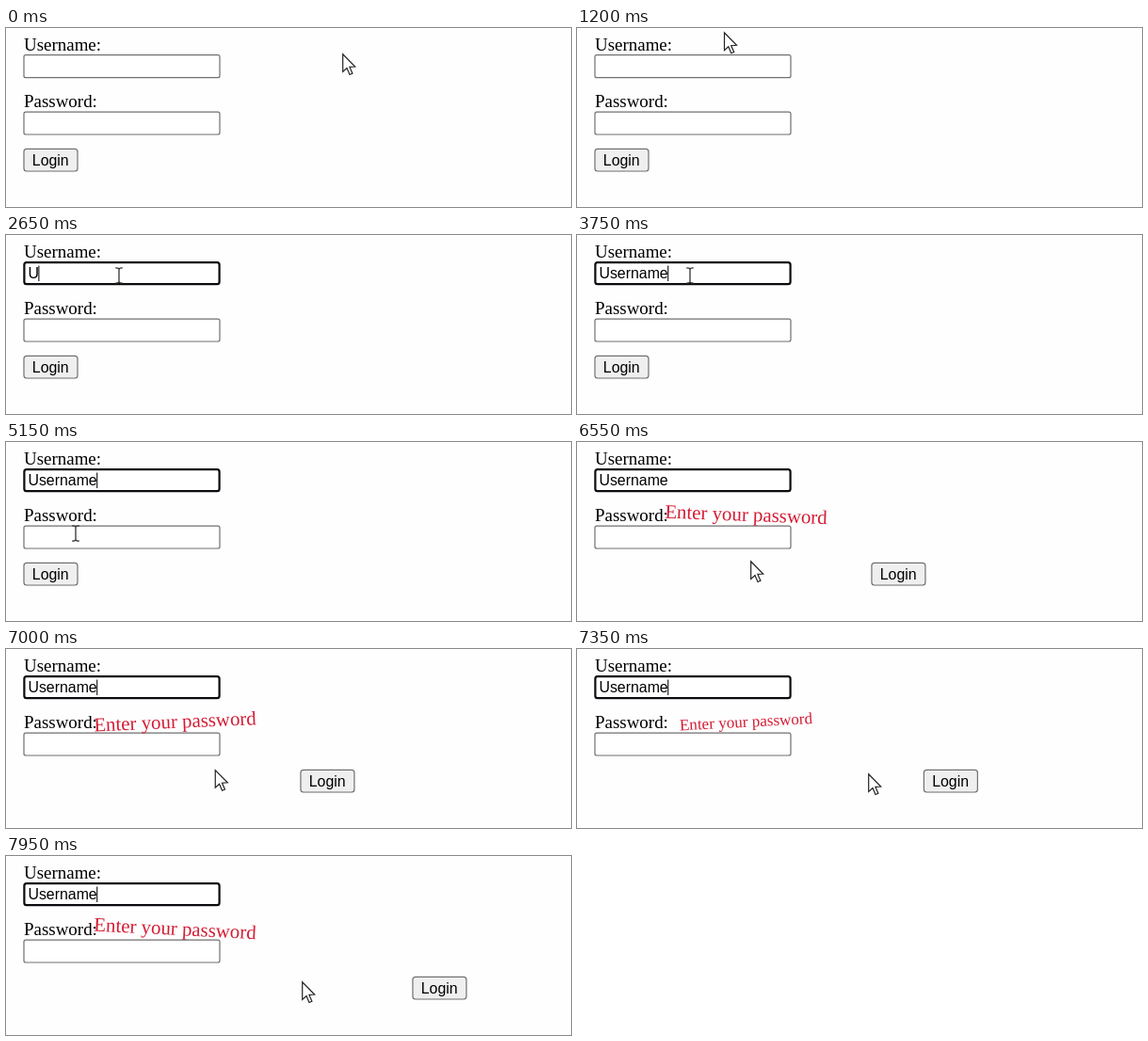
Write an HTML page with a canvas that moves like this. It is 600 px wide and 190 px high and loops after 8 s.

```html
<!DOCTYPE html>
<html lang="en">
<head>
<meta charset="utf-8">
<title>Login form</title>
<style>
  html, body { margin: 0; width: 100%; height: 100%; overflow: hidden; background: #fefefe; }
  canvas { display: block; width: 600px; height: 190px; }
</style>
</head>
<body>
<canvas id="stage" width="600" height="190"></canvas>
<script>
const ctx = document.getElementById('stage').getContext('2d');
const LOOP = 8000, STEP = 50, BLINK = 530, ZOOM = 1.19;
const SERIF = '18.95px "Liberation Serif", "Times New Roman", serif';
const SANS = '15.9px "Liberation Sans", Arial, sans-serif';
const LEFT = 19, FIELD_WIDTH = 208;
const VALUE = 'Username', FOCUS = 1650, TYPE_START = 2650, TYPE_GAP = 151;

// On each hover the button dodges right and the error wobbles.
const HOVERS = [5380, 6237, 7267];

const MOVES = [
  { from: 0, to: 450, x: 159, y: 22 },
  { from: 750, to: 900, x: 157, y: 3 },
  { from: 1170, to: 1450, x: 120, y: 43 },
  { from: 4700, to: 5100, x: 74, y: 97 },
  { from: 5200, to: 5600, x: 43, y: 130 },
  { from: 5900, to: 6300, x: 184, y: 126 },
  { from: 6800, to: 7350, x: 309, y: 132 },
  { from: 7350, to: 7950, x: 314, y: 133 }
];

const mix = (a, b, p) => a + (b - a) * p;
const clamp = p => Math.min(1, Math.max(0, p));
const smooth = p => p * p * (3 - 2 * p);

// cubic-bezier(.25, .1, .25, 1)
function ease(p) {
  if (p <= 0 || p >= 1) return clamp(p);
  let lo = 0, hi = 1, u = p;
  const bez = (a, b) => 3 * a * u * (1 - u) ** 2 + 3 * b * u * u * (1 - u) + u ** 3;
  for (let i = 0; i < 20; i++) {
    u = (lo + hi) / 2;
    if (bez(0.25, 0.25) < p) lo = u; else hi = u;
  }
  return bez(0.1, 1);
}

function pointerAt(t) {
  return MOVES.reduce((pos, m) => {
    const p = smooth(clamp((t - m.from) / (m.to - m.from)));
    return { x: mix(pos.x, m.x, p), y: mix(pos.y, m.y, p) };
  }, { x: 357, y: 27 });
}

function hoverAt(t) {
  const count = HOVERS.filter(h => h <= t).length;
  return { count, since: t - HOVERS[count - 1] };
}

function buttonX({ count, since }) {
  const spot = n => LEFT + (n ? ZOOM * (100 * n + 47) : 0);
  return count ? mix(spot(count - 1), spot(count), ease(since / 300)) : LEFT;
}

// Shrink and tilt, then swing enlarged from side to side.
function wobble(p) {
  const pose = i => {
    if (i === 0 || i >= 10) return [1, 0];
    if (i < 3) return [0.9, -3];
    return [1.1, i % 2 ? 3 : -3];
  };
  const i = Math.floor(p * 10), a = pose(i), b = pose(i + 1), s = ease(p * 10 - i);
  return [mix(a[0], b[0], s), mix(a[1], b[1], s)];
}

function text(str, x, y, font, color = '#000') {
  ctx.font = font;
  ctx.fillStyle = color;
  ctx.fillText(str, x, y);
}

function box(x, y, w, h, fill = '#fff', stroke = '#707070', width = 1.2, radius = 2) {
  ctx.beginPath();
  ctx.roundRect(x, y, w, h, radius);
  ctx.fillStyle = fill;
  ctx.fill();
  ctx.strokeStyle = stroke;
  ctx.lineWidth = width;
  ctx.stroke();
}

function drawUsername(t) {
  if (t >= FOCUS) box(LEFT + 0.4, 29.2, FIELD_WIDTH - 0.8, 23, '#fff', '#0c0c10', 2.2, 2.5);
  else box(LEFT, 28.7, FIELD_WIDTH, 24);

  const count = Math.min(VALUE.length, Math.max(0, Math.floor((t - TYPE_START) / TYPE_GAP) + 1));
  const typed = VALUE.slice(0, count);
  text(typed, 23.4, 46, SANS);
  const since = t - (count ? TYPE_START + (count - 1) * TYPE_GAP : FOCUS);
  if (since >= 0 && Math.floor(since / BLINK) % 2 === 0) {
    ctx.fillStyle = '#222';
    ctx.fillRect(22.8 + ctx.measureText(typed).width, 32.5, 1.2, 16.5);
  }
}

function drawError({ count, since }) {
  if (!count) return;
  const [scale, angle] = wobble(clamp(since / 1000));
  ctx.save();
  ctx.translate(179.5, 77.8);
  ctx.rotate(angle * Math.PI / 180);
  ctx.scale(scale, scale);
  ctx.textAlign = 'center';
  text('Enter your password', 0, 5.5, SERIF, '#d41c34');
  ctx.restore();
}

function drawArrow(x, y) {
  ctx.save();
  ctx.translate(x + 0.7, y + 0.8);
  ctx.beginPath();
  [[0, 0], [0, 18.6], [4.3, 14.7], [7.3, 21.7], [10.2, 20.4], [7.2, 13.6], [13, 13.2]]
    .forEach(p => ctx.lineTo(...p));
  ctx.closePath();
  ctx.fillStyle = '#fff';
  ctx.fill();
  ctx.strokeStyle = '#222';
  ctx.lineWidth = 1.2;
  ctx.stroke();
  ctx.restore();
}

function drawBeam(x, y) {
  ctx.beginPath();
  for (const s of [-1, 1]) {
    ctx.moveTo(x - 3.8, y + s * 8.2);
    ctx.quadraticCurveTo(x, y + s * 8.2, x, y + s * 6.5);
    ctx.quadraticCurveTo(x, y + s * 8.2, x + 3.8, y + s * 8.2);
  }
  ctx.moveTo(x, y - 7);
  ctx.lineTo(x, y + 7);
  ctx.strokeStyle = '#333';
  ctx.lineWidth = 1.3;
  ctx.stroke();
}

function drawPointer(t) {
  const { x, y } = pointerAt(t);
  const over = (right, top, bottom) => x > LEFT && x < right && y > top && y < bottom;
  const onText = over(228, 28, 53) || over(228, 89, 113) || over(96, 68, 89);
  (onText ? drawBeam : drawArrow)(x, y);
}

function draw(t) {
  const hover = hoverAt(t), x = buttonX(hover);
  ctx.fillStyle = '#fefefe';
  ctx.fillRect(0, 0, 600, 190);
  text('Username:', LEFT, 24, SERIF);
  text('Password:', LEFT, 84, SERIF);
  drawUsername(t);
  box(LEFT, 89.2, FIELD_WIDTH, 23.8);
  box(x, 128.3, 57, 23.7, '#efefef', '#707070', 1.2, 3);
  text('Login', x + 8.8, 145.6, SANS);
  drawError(hover);
  drawPointer(t);
}

const origin = performance.now();
function tick() {
  const t = (performance.now() - origin) % LOOP;
  draw(Math.floor(t / STEP) * STEP);
  requestAnimationFrame(tick);
}
tick();
</script>
</body>
</html>
```
